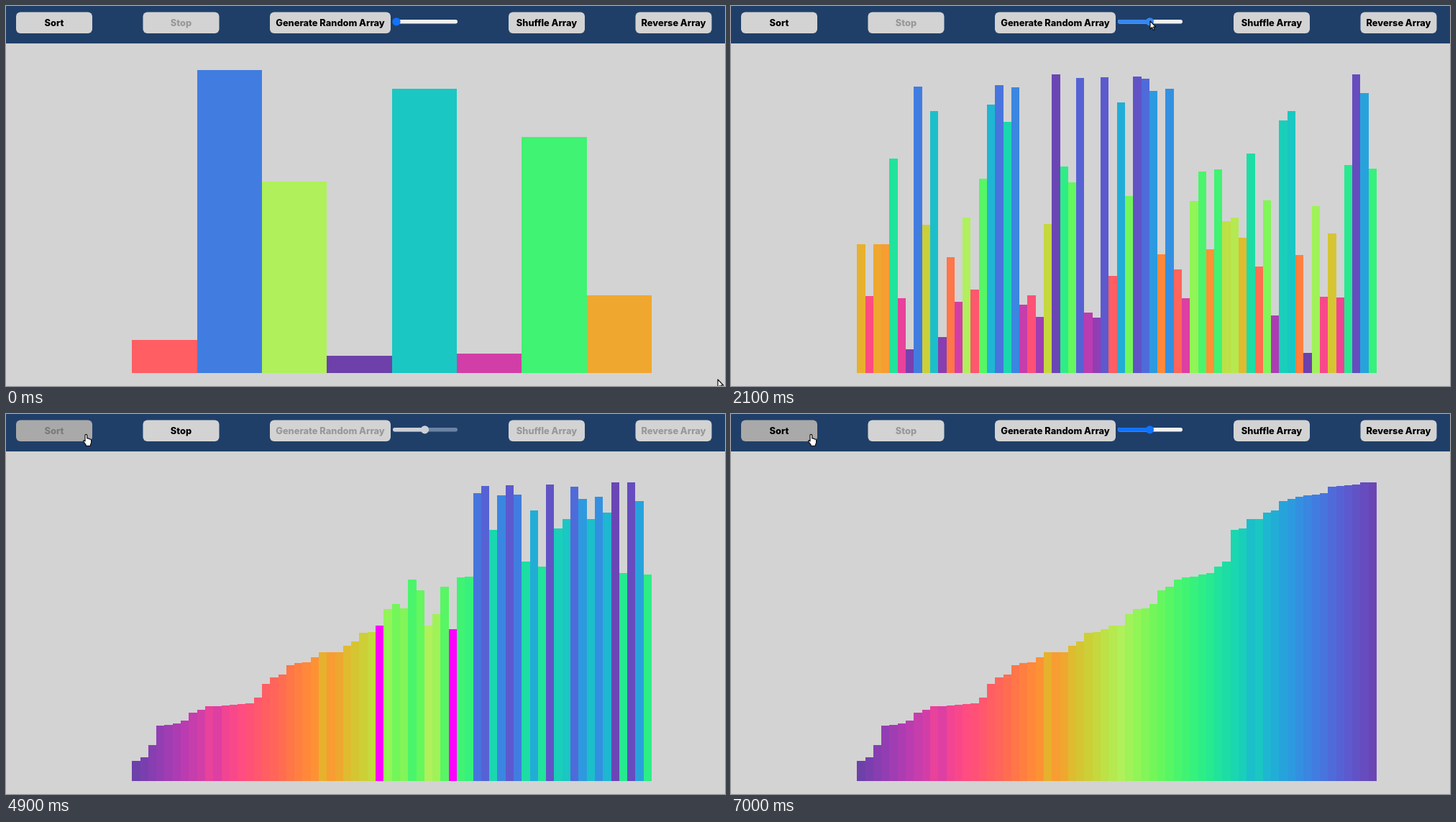
An HTML page with a canvas that plays this animation: 1000 by 528 pixels, repeating every 7.2 s.

```html
<!DOCTYPE html>
<html lang="en">
<head>
<meta charset="utf-8">
<title>Sorting visualizer</title>
<style>
  html, body { margin: 0; width: 100%; height: 100%; overflow: hidden; background: #d3d3d3; }
  canvas { display: block; width: 1000px; height: 528px; }
</style>
</head>
<body>
<canvas id="stage" width="1000" height="528"></canvas>
<script>
const ctx = document.getElementById('stage').getContext('2d');
const LOOP = 7200, TICK = 100;
const LEFT = 175.3, RIGHT = 898, FLOOR = 510;
const GRAB = 1500, DROP = 2100, CLICK = 3400, DONE = 6400;

const BUTTONS = [
  ['Sort', 14, 106], ['Stop', 190.5, 106], ['Generate Random Array', 367, 168],
  ['Shuffle Array', 699, 106], ['Reverse Array', 875.5, 106]
];

// Top edge of each bar
const FEW = [464, 89, 244, 486, 115, 483, 182, 402];
const MANY = [
  331, 403, 331, 331, 212, 406, 477, 112, 304, 146, 460, 349, 411, 294, 394, 240,
  137, 110, 161, 113, 415, 402, 432, 303, 95, 223, 245, 100, 426, 433, 99, 375,
  134, 264, 98, 101, 118, 345, 115, 366, 406, 271, 230, 338, 227, 299, 294, 322,
  205, 362, 270, 430, 159, 146, 346, 482, 278, 404, 316, 405, 221, 95, 121, 226
];

const clamp = v => Math.max(0, Math.min(1, v));
const smooth = v => { v = clamp(v); return v * v * (3 - 2 * v); };
const mix = (a, b, p) => a + (b - a) * p;

// Cubehelix rainbow
function rainbow(t) {
  const d = Math.abs(t - 0.5);
  const h = (360 * t - 100 + 120) * Math.PI / 180;
  const l = 0.8 - 0.9 * d, a = (1.5 - 1.5 * d) * l * (1 - l);
  const c = Math.cos(h), s = Math.sin(h);
  const rgb = [
    l + a * (-0.14861 * c + 1.78277 * s),
    l + a * (-0.29227 * c - 0.90649 * s),
    l + a * 1.97294 * c
  ];
  return 'rgb(' + rgb.map(v => Math.round(255 * clamp(v))).join(',') + ')';
}

function makeBars(tops) {
  const order = tops.map((top, i) => i).sort((a, b) => tops[b] - tops[a] || b - a);
  const bars = [];
  order.forEach((i, rank) => { bars[i] = { top: tops[i], color: rainbow(rank / tops.length) }; });
  return bars;
}

function randomBars(n) {
  let seed = n * 7919;
  const next = () => (seed = (seed * 16807 + 11) % 2147483647) / 2147483647;
  next();
  return makeBars(Array.from({ length: n }, () => Math.round(mix(95, 486, next()))));
}

// Quicksort, last element as pivot; records the state before every swap
function recordSort(bars) {
  const a = bars.slice(), steps = [];
  const swap = (i, j) => {
    steps.push({ bars: a.slice(), i, j });
    [a[i], a[j]] = [a[j], a[i]];
  };
  const sort = (lo, hi) => {
    if (lo >= hi) return;
    const pivot = a[hi].top;
    let i = lo;
    for (let j = lo; j < hi; j++) if (a[j].top > pivot) swap(i++, j);
    swap(i, hi);
    sort(lo, i - 1);
    sort(i + 1, hi);
  };
  sort(0, a.length - 1);
  return { steps, sorted: a };
}

const few = makeBars(FEW), many = makeBars(MANY);
const { steps, sorted } = recordSort(many);
const MID = steps.findIndex(s => s.i === 30 && s.j === 39);

function stepAt(t) {
  if (t < 4900) return Math.round(2 + (t - 3500) * (MID - 2) / 1400);
  return MID + Math.round((t - 4900) * (steps.length + 40 - MID) / 1200);
}

const dragAt = t => smooth((t - GRAB) / (DROP - GRAB));

function drawBars(bars, marks = [], markColor) {
  const w = (RIGHT - LEFT) / bars.length;
  bars.forEach((bar, i) => {
    const x = Math.round(LEFT + i * w);
    ctx.fillStyle = marks.includes(i) ? markColor : bar.color;
    ctx.fillRect(x, bar.top, Math.round(LEFT + (i + 1) * w) - x, FLOOR - bar.top);
  });
}

function drawChart(t) {
  if (t <= GRAB) return drawBars(few);
  if (t < DROP) return drawBars(randomBars(Math.round(mix(8, 64, dragAt(t)))));
  if (t <= CLICK) return drawBars(many);
  const s = stepAt(t);
  if (s < steps.length) {
    const { bars, i, j } = steps[s];
    drawBars(bars, [i, j], '#ff00ff');
  } else {
    drawBars(sorted, [s - steps.length], '#00ff00');
  }
}

function pill(x, y, w, h, r, color) {
  ctx.fillStyle = color;
  ctx.beginPath();
  ctx.roundRect(x, y, w, h, r);
  ctx.fill();
}

function drawButtons(busy, mouse) {
  ctx.font = '800 12.8px Inter, "Open Sans", sans-serif';
  ctx.textAlign = 'center';
  ctx.textBaseline = 'alphabetic';
  let hovered = false;
  for (const [label, x, w] of BUTTONS) {
    const over = mouse.x >= x && mouse.x <= x + w && mouse.y >= 8.5 && mouse.y <= 38;
    hovered = hovered || over;
    pill(x, 8.5, w, 29.5, 6, over ? '#a9a9a9' : '#d3d3d3');
    ctx.fillStyle = (label === 'Stop') === busy ? '#000' : 'rgba(16,16,16,0.3)';
    ctx.fillText(label, x + w / 2, 27.6);
  }
  return hovered;
}

function drawSlider(t, busy) {
  const x = mix(543, 582.5, dragAt(t));
  const held = t >= GRAB && t < 2300;
  const accent = busy ? '#cbd0d6' : held ? '#3787ee' : '#1173fa';
  pill(538, 19, 90, 5.5, 2.75, busy ? '#6b84a4' : '#f0f0f0');
  pill(538, 19, x - 538, 5.5, 2.75, accent);
  ctx.fillStyle = accent;
  ctx.beginPath();
  ctx.arc(x, 21.8, 5.6, 0, 7);
  ctx.fill();
}

function mouseAt(t) {
  const move = (x0, y0, x1, y1, p) => ({ x: mix(x0, x1, p), y: mix(y0, y1, p) });
  if (t < 1000) return move(990, 519, 547, 35, smooth(t / 1000));
  if (t < GRAB) return move(547, 35, 543, 21, smooth((t - 1000) / 300));
  if (t < 2200) return move(543, 21, 583, 21, dragAt(t));
  return move(583, 21, 112, 29, smooth((t - 2200) / 950));
}

const ARROW = new Path2D('M0 0V11L2.6 8.7 4.3 12.6 6.1 11.8 4.4 8H7.8Z');
const HAND = new Path2D('M-2 1Q-2-.7-.6-.7 .8-.7 .8 1V5Q2.2 4.3 3 5.5 4.4 5 5 6.2 6.6 5.9 6.6 7.6V10.5Q6.6 12 5.5 13.4V15.3H-.9V13.9L-4.2 9.4Q-4.7 8-3.4 7.7L-2 8.8Z');

function drawMouse({ x, y }, hand) {
  const shape = hand ? HAND : ARROW;
  ctx.save();
  ctx.translate(x, y);
  ctx.lineWidth = 1.2;
  ctx.lineJoin = 'round';
  ctx.strokeStyle = '#111';
  ctx.fillStyle = '#fff';
  ctx.fill(shape);
  ctx.stroke(shape);
  ctx.restore();
}

function draw(t) {
  const busy = t >= CLICK && t < DONE;
  const mouse = mouseAt(t);
  ctx.fillStyle = '#d3d3d3';
  ctx.fillRect(0, 0, 1000, 528);
  ctx.fillStyle = '#1f3f69';
  ctx.fillRect(0, 0, 1000, 52);
  drawChart(t);
  const hovered = drawButtons(busy, mouse);
  drawSlider(t, busy);
  drawMouse(mouse, hovered);
}

const start = performance.now();
function loop() {
  const t = (performance.now() - start) % LOOP;
  draw(Math.floor(t / TICK) * TICK);
  requestAnimationFrame(loop);
}
loop();
</script>
</body>
</html>
```
